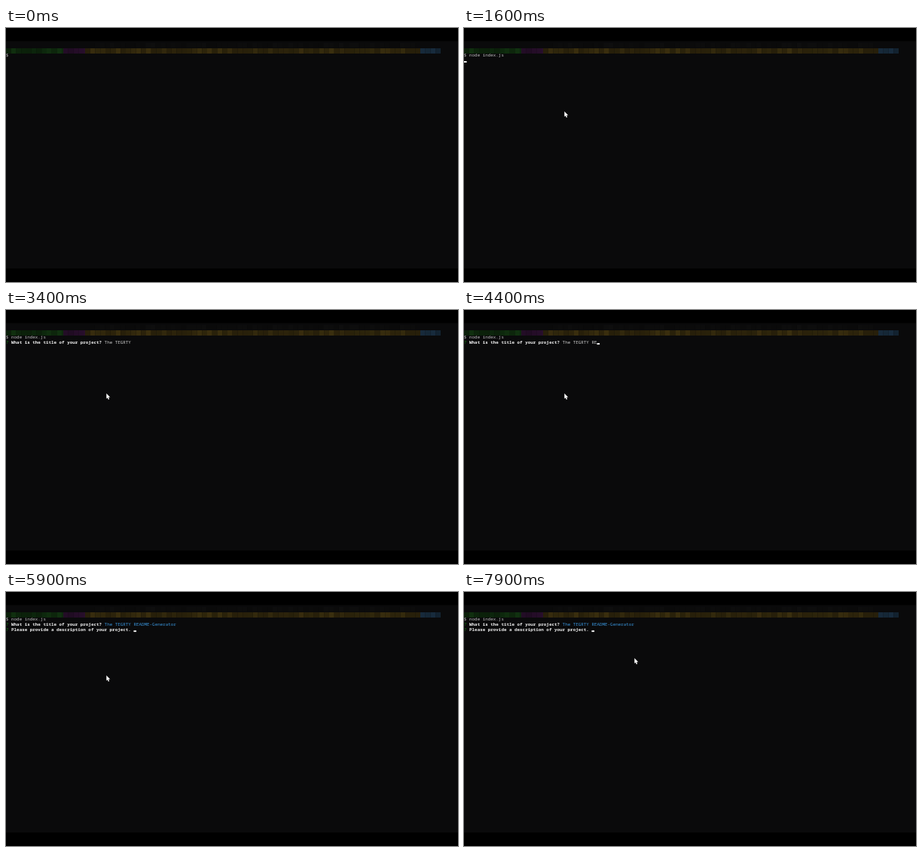
An HTML page with a canvas for the animation above (8000 ms loop, 600x338 px).

```html
<!DOCTYPE html>
<html lang="en">
<head>
<meta charset="utf-8">
<title>Terminal prompt</title>
<style>
  html, body { margin: 0; width: 100%; height: 100%; overflow: hidden; background: #000; }
  canvas { display: block; }
</style>
</head>
<body>
<canvas id="stage" width="600" height="338"></canvas>
<script>
const ctx = document.getElementById('stage').getContext('2d');
const LOOP = 8000;
const TICK = 100;
const COL = 3.53;
const ROW = 7.1;
const TOP = 33;

const QUESTION = 'What is the title of your project?';
const FOLLOW_UP = 'Please provide a description of your project.';

const FOCUS = 400, ENTER_COMMAND = 1600, ASK = 1900, ENTER_ANSWER = 5900, REDRAW = 6200;
const PAUSE = 6700, RESUME = 7800;
const SCREEN_EVENTS = [FOCUS, ENTER_COMMAND, ASK, ENTER_ANSWER, REDRAW, RESUME];

// Bursts of typing: each spreads its text evenly from its first to its last tick.
const COMMAND = [
  { text: 'node index', from: 600, to: 1100 },
  { text: '.js', from: 1300, to: 1500 },
];
const ANSWER = [
  { text: 'The TEGR', from: 2100, to: 2800 },
  { text: 'TY ', from: 3000, to: 3200 },
  { text: 'README', from: 4300, to: 4800 },
  { text: '-', from: 5100, to: 5100 },
  { text: 'Generator', from: 5300, to: 5700 },
];

function typedText(bursts, t) {
  return bursts.filter(burst => t >= burst.from).map(({ text, from, to }) => {
    const step = Math.floor((t - from) / TICK) + 1;
    const steps = (to - from) / TICK + 1;
    return text.slice(0, Math.floor(text.length * step / steps));
  }).join('');
}

// The cursor stays lit after each key or redraw, then blinks; it is dark while paused.
function cursorVisible(t) {
  if (t < FOCUS || (t >= PAUSE && t < RESUME)) return false;
  const keys = [...COMMAND, ...ANSWER].filter(b => t >= b.from).map(b => Math.min(t, b.to));
  const idle = t - Math.max(...keys, ...SCREEN_EVENTS.filter(time => time <= t));
  return idle < 200 || (idle >= 300 && (idle - 300) % 400 < 200);
}

function seededRandom(seed) {
  return () => (seed = seed * 16807 % 2147483647) / 2147483647;
}

function rect(x, y, w, h, color) {
  ctx.fillStyle = color;
  ctx.fillRect(x, y, w, h);
}

// A strip of square tiles whose brightness varies around one hue.
function mosaic(left, right, y, height, [hue, saturation, light], spread, random) {
  const tile = 6.75;
  for (let x = left; x < right; x += tile) {
    const value = light + spread * (random() ** 2 - 0.3);
    rect(x, y, Math.min(tile, right - x), height, `hsl(${hue} ${saturation}% ${value}%)`);
  }
}

function drawBackground() {
  const random = seededRandom(71);
  rect(0, 0, 600, 338, '#000');
  rect(0, 17.5, 600, 302.5, '#0a0a0b');
  mosaic(111, 545, 20, 6, [0, 0, 4.4], 1.5, random);
  mosaic(0, 76, 27, 7, [118, 52, 9.5], 5, random);
  mosaic(76, 105, 27, 7, [292, 50, 10], 3, random);
  mosaic(105, 550, 27, 7, [44, 60, 11], 5, random);
  mosaic(550, 577, 27, 7, [208, 45, 14], 4, random);
}

function write(text, col, row, color, weight = 500) {
  ctx.save();
  ctx.translate(col * COL, TOP + row * ROW + 5.1);
  ctx.scale(0.1, 0.1); // large font scaled down keeps fractional advances
  ctx.font = `${weight} 58.8px "Noto Sans Mono", monospace`;
  ctx.fillStyle = color;
  ctx.fillText(text, 0, 0);
  ctx.restore();
}

function writeQuestion(text, row) {
  write('?', 0, row, '#12800f');
  write(text, 2, row, '#f2f2f2', 600);
}

function drawPointer(x, y) {
  ctx.beginPath();
  [[0, 0], [0, 7], [1.5, 5.7], [2.6, 8.2], [3.8, 7.7], [2.8, 5.3], [5, 5.2]]
    .forEach(([dx, dy]) => ctx.lineTo(x + dx, y + dy));
  ctx.closePath();
  ctx.fillStyle = '#fff';
  ctx.fill();
}

function drawTerminal(t) {
  const command = '$ ' + typedText(COMMAND, t);
  let cursor = [command.length, 0];
  write(command, 0, 0, '#bdbdbd');

  if (t >= ENTER_COMMAND) cursor = [0, 1];
  if (t >= ASK) {
    const answer = typedText(ANSWER, t);
    const answerCol = QUESTION.length + 3;
    writeQuestion(QUESTION, 1);
    write(answer, answerCol, 1, t < ENTER_ANSWER ? '#ccc' : '#3a96dd');
    cursor = [answerCol + answer.length, 1];
  }
  if (t >= ENTER_ANSWER) {
    writeQuestion(FOLLOW_UP, 2);
    cursor = [FOLLOW_UP.length + 3, 2];
  }

  if (cursorVisible(t)) rect(cursor[0] * COL, TOP + cursor[1] * ROW + 4, 3.6, 1.9, '#fff');
}

function render(now) {
  const t = now % LOOP;
  drawBackground();
  drawTerminal(t);
  if (t >= 200 && t < 6100) drawPointer(133.3, 111);
  if (t >= RESUME) drawPointer(226.3, 88);
}

const start = performance.now();
function tick() {
  render(performance.now() - start);
  requestAnimationFrame(tick);
}
tick();
</script>
</body>
</html>
```
